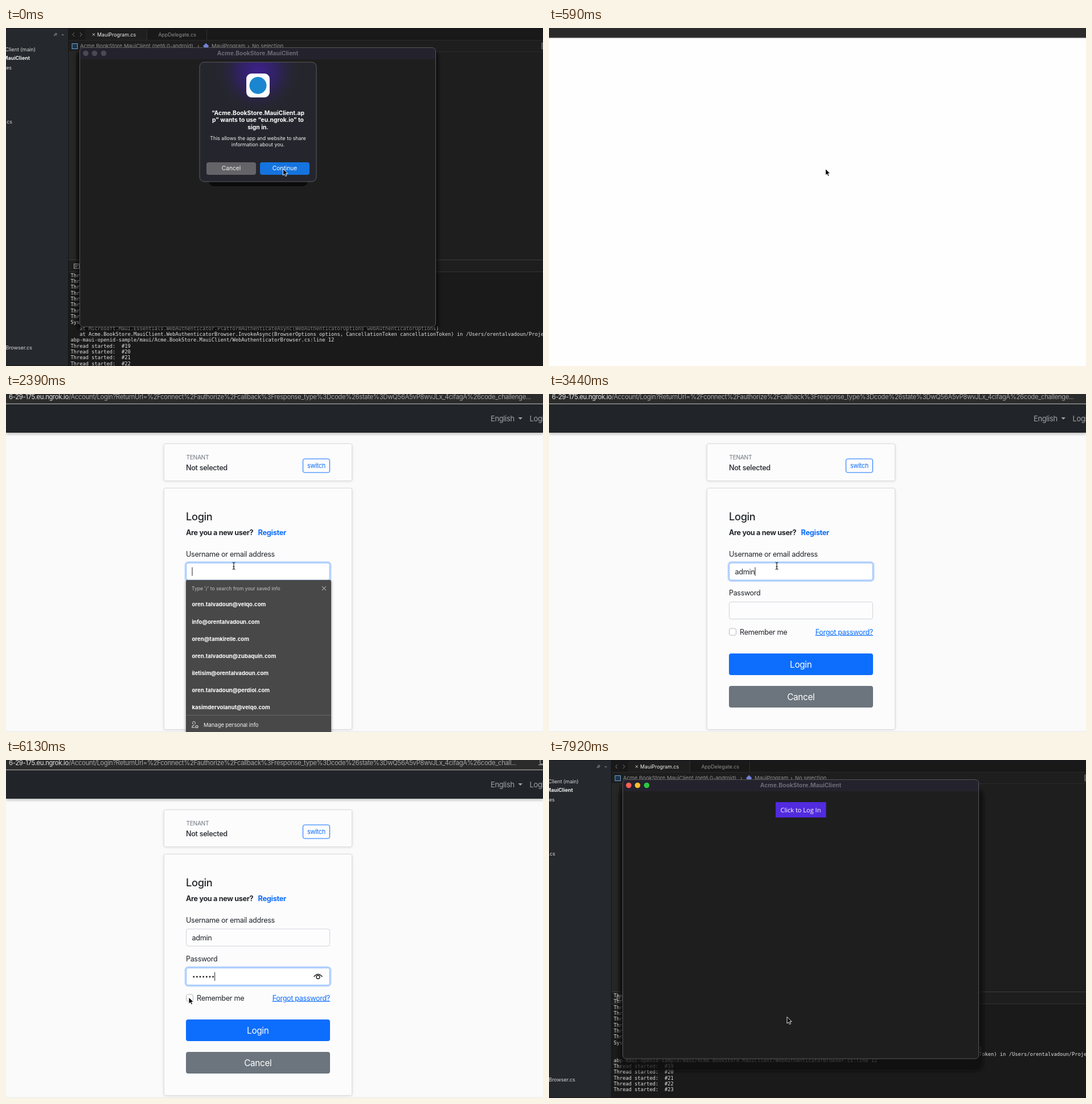
An HTML page that plays this animation: 943 by 594 pixels, repeating every 8 s.

```html
<!DOCTYPE html>
<html lang="en">
<head>
<meta charset="utf-8">
<title>Sign in from a desktop app</title>
<style>
html, body { margin: 0; width: 100%; height: 100%; overflow: hidden; background: #1e1e1e; }
svg { display: block; width: 943px; height: 594px; font-family: Inter, "Noto Sans", sans-serif; }
text { white-space: pre; }
.tight { letter-spacing: -.02em; }
.mono { font-family: "DejaVu Sans Mono", monospace; }
</style>
</head>
<body>
<svg id="stage" viewBox="0 0 943 594" xmlns="http://www.w3.org/2000/svg"></svg>
<script>
const LOOP = 8000;
const stage = document.getElementById('stage');

// Markup helpers
const rect = (x, y, w, h, fill, more = '') =>
  `<rect x="${x}" y="${y}" width="${w}" height="${h}" fill="${fill}" ${more}/>`;
const text = (x, y, size, fill, str, more = '') =>
  `<text x="${x}" y="${y}" font-size="${size}" fill="${fill}" ${more}>${str}</text>`;
const path = (d, more) => `<path d="${d}" ${more}/>`;
const group = (id, body, more = '') => `<g id="${id}" ${more}>${body}</g>`;
const dots = (y, r, xs, fills) =>
  xs.map((x, i) => `<circle cx="${x}" cy="${y}" r="${r}" fill="${fills[i]}"/>`).join('');
const MID = 'text-anchor="middle"', END = 'text-anchor="end"', BOLD = 'font-weight="700"';
const LIGHTS = ['#ff5f57', '#febc2e', '#28c840'];

function ide() {
  const light = '#d8d8d8', gray = '#8e8e8e';
  return rect(0, 0, 943, 594, '#1e1e1e') +
    rect(110, 0, 833, 21, '#191919') + rect(139, 2, 108, 19, '#1f1f1f') +
    rect(247, 2, 1, 19, '#303030') + rect(352, 2, 1, 19, '#303030') +
    rect(110, 21, 833, 1, '#2a2a2a') + rect(110, 41, 833, 1, '#2a2a2a') +
    rect(110, 42, 13, 365, '#262626') +
    rect(110, 407, 833, 1, '#3c3c3c') + rect(110, 428, 833, 166, '#1a1a1a') + rect(110, 428, 833, 1, '#343434') +
    rect(0, 0, 109, 594, '#25282d') + rect(109, 0, 1, 594, '#151515') +
    rect(0, 0, 943, 1, '#191522') + rect(0, 593, 943, 1, '#20181a') +
    path('M120 8l-3 3.500 3 3.500M130 8l3 3.500-3 3.500', 'fill="none" stroke="#777"') +
    path('M152 9.500l4 4m0-4l-4 4', 'stroke="#ddd"') +
    text(160, 14.500, 8.850, '#f0f0f0', 'MauiProgram.cs') + text(267.500, 14.500, 8.850, gray, 'AppDelegate.cs') +
    rect(116, 27.500, 9.500, 9, '#20354a', 'stroke="#6ba6d8"') +
    text(130, 35, 9.400, gray, 'Acme.BookStore.MauiClient (net6.0-android)') +
    text(336, 35, 9.400, gray, '›') +
    rect(347.500, 28, 7.500, 7.500, '#7181d8', 'transform="rotate(45 351.200 31.700)"') +
    text(361, 35, 9.400, gray, 'MauiProgram') + text(424, 35, 9.400, gray, '›') +
    text(432, 35, 9.400, gray, 'No selection') +
    rect(940, 25, 8, 13, '#555', 'rx="2"') +
    path('M84 14l2-2m-1-1.500l3 3m-2-3l2-1.500 1.500 1.500-1.500 2M98 12h3.500', 'stroke="#aaa" fill="none"') +
    text(52, 40.500, 8.900, light, 'MauiClient (main)', END) +
    text(42, 56, 8.900, '#eee', 'MauiClient', END + BOLD) +
    text(10, 72.500, 8.900, light, 'Dependencies', END) + text(11, 167.500, 8.900, light, 'App.xaml.cs', END) +
    text(46, 565, 8.900, light, 'WebAuthenticatorBrowser.cs', END) +
    rect(119.500, 414.500, 9, 8, 'none', 'stroke="#aaa"') + path('M121 417h6M121 419.500h4', 'stroke="#aaa"');
}

function consoleLines() {
  const threads = (from, n) => Array.from({ length: n }, (_, i) => `Thread started:  #${from + i}`);
  const lines = [...threads(11, 8),
    'System.Threading.Tasks.TaskCanceledException: A task was canceled.',
    '   at Microsoft.Maui.Essentials.WebAuthenticator.PlatformAuthenticateAsync(WebAuthenticatorOptions webAuthenticatorOptions)',
    '   at Acme.BookStore.MauiClient.WebAuthenticatorBrowser.InvokeAsync(BrowserOptions options, CancellationToken cancellationToken) in /Users/orentalvadoun/Projects/',
    'abp-maui-openid-sample/maui/Acme.BookStore.MauiClient/WebAuthenticatorBrowser.cs:line 12',
    ...threads(19, 5)];
  return group('log', lines.map((s, i) =>
    text(113.500, 437.600 + i * 10.330, 8.740, '#e2e2e2', s, 'class="mono"')).join(''));
}

function appWindow() {
  return group('softShadow', rect(124, 40, 636, 492, '#000', 'rx="9" opacity=".45" filter="url(#blur2)"')) +
    group('deepShadow', rect(123, 48, 640, 499, '#111', 'rx="16" opacity=".75" filter="url(#blur2)"')) +
    rect(129.500, 34.500, 625, 490.500, '#1e1e1e', 'rx="6"') +
    path('M130 55V41q0-6 6-6H748q6 0 6 6V55Z', 'fill="#24222d"') +
    rect(129.500, 34.500, 625, 490.500, 'none', 'rx="6" stroke="#57575a"') +
    text(442, 47.700, 10.300, '#6d6b76', 'Acme.BookStore.MauiClient', MID + BOLD) +
    group('lightsOff', dots(44.500, 4.800, [140, 155.500, 171.500], Array(3).fill('#4b4955'))) +
    group('lightsOn', dots(44.500, 4.800, [140, 155.500, 171.500], LIGHTS)) +
    rect(398, 74, 88.500, 27, '#512bdf') +
    text(442, 91.500, 11, '#fff', 'Click to Log In', MID + 'font-family="Open Sans, sans-serif"');
}

function dialog() {
  const bold = (y, s) => text(442.500, y, 10.300, '#fff', s, MID + BOLD);
  return rect(356, 255, 174, 23, '#0b0b0c', 'rx="9"') +
    rect(340, 60, 205, 210, '#25262d', 'rx="8"') + rect(340, 60, 205, 130, 'url(#glow)', 'rx="8"') +
    rect(340, 60, 205, 210, 'none', 'rx="8" stroke="#5a5a62"') +
    rect(422, 80, 41, 42, '#fbfcfd', 'rx="9"') + dots(101, 15, [442.500], ['#1a86cf']) +
    bold(152.500, '“Acme.BookStore.MauiClient.ap') + bold(165, 'p” wants to use “eu.ngrok.io” to') + bold(177.700, 'sign in.') +
    text(442.500, 197, 8.780, '#f2f2f2', 'This allows the app and website to share', MID) +
    text(442.500, 208, 8.780, '#f2f2f2', 'information about you.', MID) +
    rect(352, 236, 87, 22, '#646468', 'rx="4"') + rect(446, 236, 87, 22, '#1473de', 'rx="4"') +
    text(395.500, 250, 10.200, '#f2f2f2', 'Cancel', MID) + text(489.500, 250, 10.200, '#fff', 'Continue', MID);
}

function openingWindow() {
  return rect(21, 58, 842, 474, '#000', 'rx="6" opacity=".5" filter="url(#blur2)"') +
    `<g opacity=".75">` + rect(21, 56, 842, 475, '#fff', 'rx="6"') +
    path('M21 72V62q0-6 6-6H857q6 0 6 6V72Z', 'fill="#302c30"') + rect(21, 72, 842, 18, '#1c1c1c') + `</g>` +
    rect(21.500, 56.500, 841, 474, 'none', 'rx="6" stroke="#777" stroke-opacity=".5"') +
    dots(64, 3.500, [29, 40.500, 52], LIGHTS) +
    text(442, 66.800, 8, '#bbb', 'Untitled', MID + BOLD) +
    `<circle cx="33.500" cy="81" r="4.500" fill="none" stroke="#bbb"/>` + path('M33.500 80.500v3M33.500 78v1', 'stroke="#bbb"') +
    rect(46, 76, 46, 11, '#3f638a') + text(46, 84, 8.400, '#eee', 'about:blank');
}

function field(id, y) {
  return rect(316.500, y, 252, 30, '#fdfdfe', 'rx="3.500" stroke="#ced4da"') +
    group(id, rect(315, y - 1.500, 255, 33, 'none', 'rx="5" stroke="#bfd8fd" stroke-width="3"') +
      rect(316.500, y, 252, 30, '#fff', 'rx="3.500" stroke="#86b7fe"'));
}

function loginPage() {
  const ink = '#212529', blue = '#0d6efd', size = 12.650;
  const card = (y, h) => rect(277, y + 1, 331, h, '#000', 'rx="3" opacity=".12" filter="url(#blur2)"') +
    rect(277.500, y, 330, h, '#fcfcfd', 'rx="3" stroke="#dcdcde"');
  return rect(0, 18, 943, 576, '#fafafa') +
    rect(0, 60, 943, 11, '#000', 'opacity=".2" filter="url(#blur2)"') + rect(0, 18, 943, 50, '#212529') +
    `<g class="tight">` +
    text(851, 47.600, 12.900, '#a0a3a6', 'English') + path('M899.500 41h7.500l-3.750 4Z', 'fill="#a0a3a6"') +
    text(919.500, 47.600, 12.900, '#a0a3a6', 'Login') +
    card(87.500, 65) + card(165.500, 424) +
    text(316.500, 115.300, 10.200, '#6c757d', 'TENANT') +
    text(316, 134.300, 12.700, ink, 'Not selected', 'font-weight="500"') +
    rect(521.500, 114, 47, 24, '#fcfcfd', `rx="3" stroke="${blue}"`) + text(545, 130, 11, blue, 'switch', MID) +
    text(316, 222.300, 18.200, ink, 'Login', 'font-weight="500"') +
    text(316, 247.800, 12.600, ink, 'Are you a new user?', BOLD) + text(442.500, 247.800, 12.800, blue, 'Register', BOLD) +
    text(316, 286.300, size, ink, 'Username or email address') + field('userFocus', 297) +
    text(326.500, 317, 12.700, ink, '', 'id="userText"') +
    text(316, 354.300, 12.500, ink, 'Password') + field('passFocus', 365.500) +
    group('pass', '') +
    group('eye', path('M540.500 381q7.500-9 15 0', 'fill="none"') + `<circle cx="548" cy="381.500" r="3" fill="none"/>`, 'stroke="#222" stroke-width="1.400"') +
    group('checkFocus', rect(314.500, 410, 16, 16, 'none', 'rx="4.500" stroke="#bfd8fd" stroke-width="3"')) +
    rect(316.500, 412, 12, 12, '#fff', 'rx="3" stroke="#b4b7ba"') +
    group('checked', rect(316, 411.500, 13, 13, blue, 'rx="3"') + path('M319.300 418.200l2.300 2.300 4.200-4.400', 'fill="none" stroke="#fff" stroke-width="1.600"')) +
    text(335, 422.600, size, ink, 'Remember me') +
    text(569, 422.600, 12.600, blue, 'Forgot password?', END + ' text-decoration="underline"') +
    group('loginFocus', rect(314.500, 454.500, 256, 41, 'none', 'rx="5.500" stroke="#9fc2f8" stroke-width="3"')) +
    rect(316, 456, 253, 38, blue, 'rx="4" id="loginButton"') + text(442.300, 481, 15.300, '#fff', 'Login', MID) +
    rect(316, 513, 253, 38, '#6c757d', 'rx="4"') + text(442.300, 538, 15.300, '#fff', 'Cancel', MID) +
    `</g>` +
    rect(0, 592.500, 943, 1.500, '#eeeeee');
}

function suggestions() {
  const emails = ['oren.talvadoun@velqo.com', 'info@orentalvadoun.com', 'oren@tamkirelle.com',
    'oren.talvadoun@zubaquin.com', 'iletisim@orentalvadoun.com', 'oren.talvadoun@perdiol.com', 'kasimdervolanut@velqo.com'];
  return rect(315, 328, 257, 270, '#000', 'opacity=".3" filter="url(#blur2)"') +
    rect(316, 327, 255, 270, '#484848', 'rx="2"') +
    text(326, 344.700, 8.500, '#c4c4c4', "Type '/' to search from your saved info") +
    path('M555 338l7 7m0-7l-7 7', 'stroke="#ddd"') +
    group('emails', emails.map((e, i) => text(326.500, 373.400 + i * 30.170, 9.550, '#fff', e)).join('')) +
    rect(316, 564, 255, 1, '#666') +
    path('M329 580.500a2.500 2.500 0 1 1 2 0M326.500 586q0-4 4-4M326.500 586h5M333 583h4v3.500h-4Z', 'fill="none" stroke="#eee"') +
    text(347, 584.500, 9.440, '#f4f4f4', 'Manage personal info');
}

function browser() {
  return rect(0, 0, 943, 594, '#fefefe') + rect(0, 0, 943, 17, '#2b2b2b') + rect(0, 16, 943, 1.500, '#484848') +
    group('url', text(110, 9, 11.300, '#e4e4e4', '6-29-175.eu.ngrok.io', END) + text(110, 9, 11.300, '#a3a3a3', '', 'id="query"'), 'class="tight"') +
    group('keyIcon', rect(927, -6, 30, 20, '#2b2b2b') + path('M938 0v7h8M935 8.500h9', 'fill="none" stroke="#bbb"')) +
    group('login', loginPage()) + group('popup', suggestions()) +
    group('caret', rect(0, 0, 1, 15, '#222'));
}

const pointers =
  group('arrow', path('M0 0V11.500L2.700 9l1.800 4 2-.9L4.700 8.300H8.300Z', 'fill="#000" stroke="#fff" stroke-width=".9"')) +
  group('ibeam', path('M-2.500-6Q0-6 0-4.500Q0-6 2.500-6M0-4.500V4.500M-2.500 6Q0 6 0 4.500Q0 6 2.500 6M-1.500 1.500h3', 'fill="none" stroke="#111" stroke-width="1.100"')) +
  group('hand', path('M-1-6.500c1 0 1.200.7 1.200 1.500v3l4.600 1c1 .3 1.300 1 1.200 2L5 6H-1.500L-5.500.5c-.6-1 .6-2 1.600-1.200L-2.300.8V-5c0-.8.4-1.500 1.300-1.500Z', 'fill="#fff" stroke="#111"') +
    path('M.5 1.500v2.500M2.500 1.500v2.500', 'stroke="#111" stroke-width=".8"'));

stage.innerHTML = `<defs>
  <filter id="blur2" x="-10%" y="-50%" width="120%" height="200%"><feGaussianBlur stdDeviation="2"/></filter>
  <radialGradient id="glow" gradientUnits="userSpaceOnUse" cx="442" cy="76" r="76">
    <stop offset="0" stop-color="#3d218c"/><stop offset=".45" stop-color="#30225f"/><stop offset="1" stop-color="#25262d" stop-opacity="0"/>
  </radialGradient></defs>` +
  group('desktop', ide() + consoleLines() + appWindow() + group('dialog', dialog()) + group('opening', openingWindow())) +
  group('browser', browser()) + group('cursor', pointers);

const $ = Object.fromEntries([...stage.querySelectorAll('[id]')].map(el => [el.id, el]));
const show = (id, alpha) => {
  $[id].setAttribute('display', alpha ? 'inline' : 'none');
  $[id].setAttribute('opacity', Number(alpha));
};
const at = (t, keys) => keys.reduce((cur, key) => t >= key[0] ? key : cur);

const QUERY = '/Account/Login?ReturnUrl=%2Fconnect%2Fauthorize%2Fcallback%3Fresponse_type%3Dcode%26state%3DwQ56A5vP8wvJLx_4cifagA%26code_chall';
const TYPED = [[0, ''], [2840, 'a'], [2990, 'ad'], [3290, 'adm'], [3440, 'admin']];
const DOTS = [[0, 0], [3740, 1], [4040, 2], [4190, 3], [4480, 4], [4630, 5], [4930, 6], [5080, 7]];
const POINTER = [
  [0, 486.500, 247.500, 'arrow'], [590, 485.500, 247.500, 'arrow'],
  [1640, 479, 252, 'arrow'], [1790, 456, 268, 'arrow'], [1940, 425, 287, 'ibeam'], [2090, 406, 299, 'ibeam'], [2240, 400, 302, 'ibeam'],
  [5530, 396, 312, 'ibeam'], [5680, 381, 352, 'arrow'], [5830, 355, 400, 'arrow'], [5980, 334, 425, 'arrow'], [6130, 321, 417, 'arrow'],
  [6580, 326, 423, 'arrow'], [6730, 350, 443, 'arrow'], [6880, 390, 465, 'hand'], [7030, 415, 474, 'hand'], [7180, 425, 476, 'hand'],
  [7630, 424, 472, 'arrow'], [7780, 421, 460, 'arrow'], [7920, 418, 451.500, 'arrow']];

function update(t) {
  const between = (a, b) => t >= a && t < b;
  const inBrowser = between(590, 7630), active = t >= 7780;
  show('desktop', !inBrowser);
  show('browser', inBrowser);

  show('dialog', t < 150 ? 1 : t < 290 ? .5 : 0);
  show('opening', between(440, 590));
  show('lightsOn', active);
  show('lightsOff', !active);
  show('deepShadow', active);
  show('softShadow', !active);
  $.log.setAttribute('transform', `translate(0 ${t >= 7920 ? -20.660 : 0})`);

  const onUser = between(1190, 3590), onPass = between(3590, 6280), key = between(3590, 7180);
  show('url', t >= 740);
  show('keyIcon', key);
  $.query.textContent = QUERY + (key ? '...' : t < 7180 ? 'enge...' : 'enge%');
  show('login', t >= 1040);
  show('popup', between(2390, 3290));
  $.emails.setAttribute('font-weight', t < 2840 ? 700 : 400);

  const typed = at(t, TYPED)[1], count = at(t, DOTS)[1];
  show('userFocus', onUser && (t < 1340 ? .5 : 1));
  $.userText.textContent = typed;
  show('passFocus', onPass);
  $.pass.innerHTML = dots(381, 1.450, Array.from({ length: count }, (_, i) => 329.700 + i * 5.650), Array(count).fill('#222'));
  show('eye', onPass && count);
  show('caret', onUser || onPass);
  const caretX = onUser ? 326.500 + (typed && $.userText.getComputedTextLength()) : 326.600 + count * 5.650;
  $.caret.setAttribute('transform', `translate(${caretX} ${onUser ? 304.500 : 373})`);

  show('checked', t >= 6280);
  show('checkFocus', between(6280, 7180));
  show('loginFocus', t >= 7180);
  $.loginButton.setAttribute('fill', t >= 6880 ? '#0b5ed7' : '#0d6efd');

  const [, x, y, kind] = at(t, POINTER);
  $.cursor.setAttribute('transform', `translate(${x} ${y})`);
  for (const id of ['arrow', 'ibeam', 'hand']) show(id, id === kind);
}

function tick() {
  update(performance.now() % LOOP);
  requestAnimationFrame(tick);
}
tick();
</script>
</body>
</html>
```
